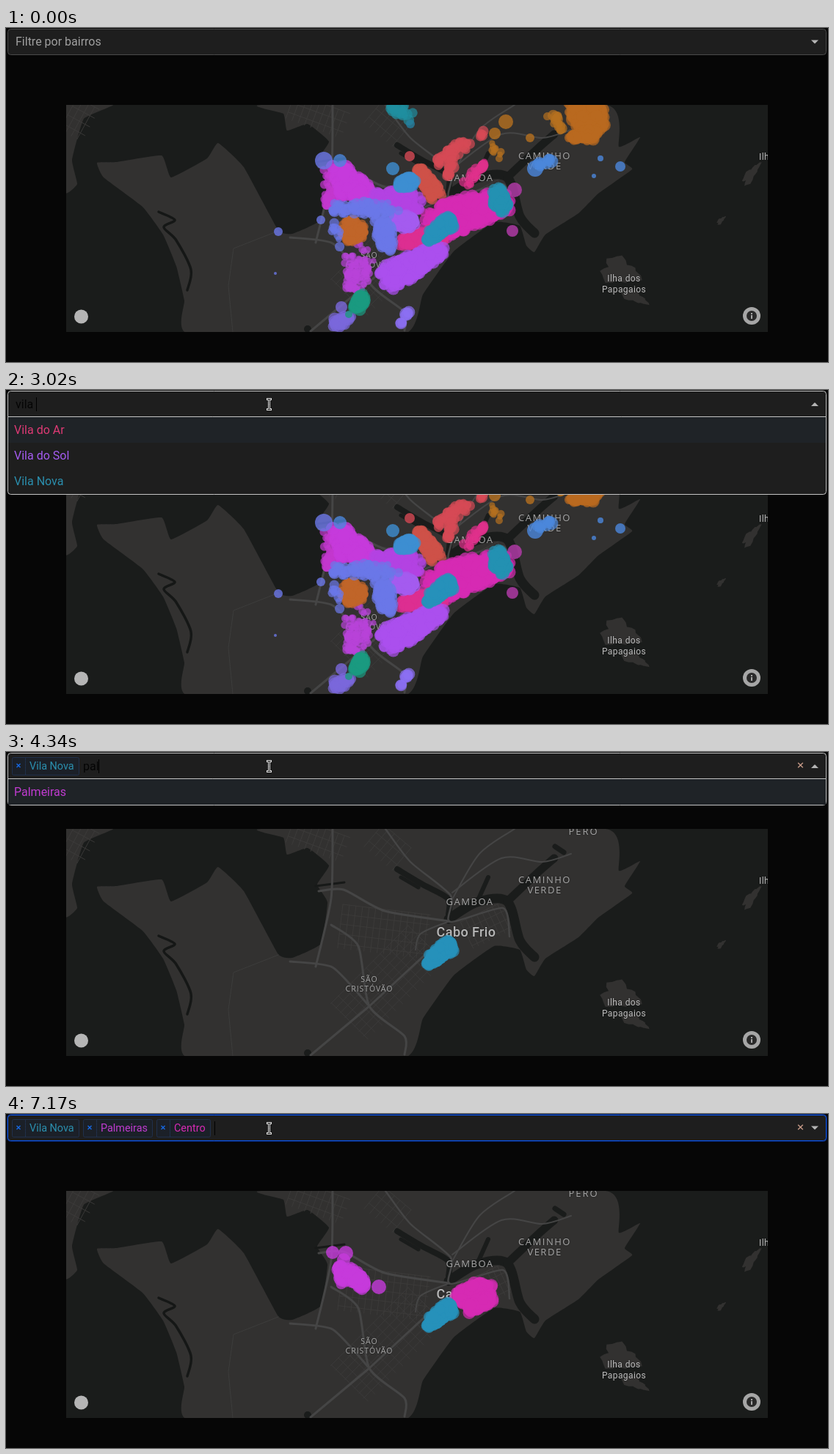
Recreate the animation shown at these times as an HTML page with a canvas. Size 1120x456 px, loop 7.66 s.

```html
<!DOCTYPE html>
<html lang="pt-BR">
<head>
<meta charset="utf-8">
<title>Filtro por bairros</title>
<style>
html, body { margin: 0; width: 100%; height: 100%; overflow: hidden; background: #060606; }
canvas { display: block; }
</style>
</head>
<body>
<canvas id="stage" width="1120" height="456"></canvas>
<script>
const W = 1120, H = 456, LOOP = 7660;
const MAP = [82, 105, 956, 310];
const ctx = document.getElementById('stage').getContext('2d');
const WATER = '#1a1c1b', LAND = '#323130', ROAD = '#454545';
const TEAL = '#2792ba', VIOLET = '#c63bdc', MAGENTA = '#d62bb4', ORANGE = '#b5701f';
const BLUE = '#4b87dc', PERIWINKLE = '#6b78e8', RED = '#d64a55', GREY = '#a6a6a6';

function layer(paint) {
  const c = document.createElement('canvas');
  c.width = W;
  c.height = H;
  const g = c.getContext('2d');
  g.beginPath();
  g.rect(...MAP);
  g.clip();
  g.lineJoin = g.lineCap = 'round';
  paint(g);
  return c;
}

// A path through flat x, y points; bend rounds it as a cardinal spline.
function trace(g, p, bend = 0, close = false) {
  const n = p.length / 2;
  const at = i => {
    const k = close ? (i + n) % n : Math.max(0, Math.min(n - 1, i));
    return [p[2 * k], p[2 * k + 1]];
  };
  g.beginPath();
  g.moveTo(p[0], p[1]);
  for (let i = 0; i < (close ? n : n - 1); i++) {
    const [ax, ay] = at(i - 1), [bx, by] = at(i), [cx, cy] = at(i + 1), [dx, dy] = at(i + 2);
    g.bezierCurveTo(bx + (cx - ax) * bend, by + (cy - ay) * bend, cx - (dx - bx) * bend, cy - (dy - by) * bend, cx, cy);
  }
}
function area(g, p, color, bend = 0) {
  trace(g, p, bend, true);
  g.fillStyle = color;
  g.fill();
}
function line(g, p, color, width, bend = 0) {
  trace(g, p, bend);
  g.strokeStyle = color;
  g.lineWidth = width;
  g.stroke();
}
function disc(g, x, y, r, color) {
  g.beginPath();
  g.arc(x, y, r, 0, 7);
  g.fillStyle = color;
  g.fill();
}
function label(g, text, x, y, font, color, align = 'left', spacing = 0) {
  g.font = font;
  g.letterSpacing = spacing + 'px';
  g.textAlign = align;
  g.fillStyle = color;
  g.fillText(text, x, y);
  g.letterSpacing = '0px';
}

let seed = 1;
function rnd() {
  seed = (seed * 1664525 + 1013904223) >>> 0;
  return seed / 4294967296;
}

// ---- base map ----
function island(g, x, y, rx, ry, tilt) {
  const p = [];
  for (let a = 0; a < 6.28; a += 0.26) {
    const k = 1 + 0.22 * Math.sin(3 * a + 1) + 0.14 * Math.sin(7 * a);
    const u = rx * k * Math.cos(a), v = ry * k * Math.sin(a);
    p.push(x + u * Math.cos(tilt) - v * Math.sin(tilt), y + u * Math.sin(tilt) + v * Math.cos(tilt));
  }
  area(g, p, LAND);
}

function streets(g, x, y, w, h, tilt, gap) {
  g.save();
  g.translate(x, y);
  g.rotate(tilt);
  g.strokeStyle = '#3d3c3b';
  g.lineWidth = 0.8;
  g.beginPath();
  for (let u = -w / 2; u <= w / 2; u += gap) {
    g.moveTo(u, -h / 2);
    g.lineTo(u, h / 2);
  }
  for (let v = -h / 2; v <= h / 2; v += gap * 1.5) {
    g.moveTo(-w / 2, v);
    g.lineTo(w / 2, v);
  }
  g.stroke();
  g.restore();
}

const lagoon = [124, 184, 150, 183, 212, 174, 225, 204, 274, 178, 289, 157, 324, 190, 371, 276, 390, 281,
  429, 262, 438, 205, 424, 181, 440, 155, 411, 131, 383, 140, 378, 117, 349, 105];
const eastCoast = [817, 105, 835, 162, 864, 149, 843, 183, 853, 193, 807, 226, 780, 253, 735, 282,
  720, 306, 709, 297, 700, 270, 665, 265, 610, 305, 568, 364, 543, 417];
const westCoast = [248, 417, 243, 372, 232, 325, 214, 282, 186, 244, 133, 204];

const base = layer(g => {
  g.fillStyle = WATER;
  g.fillRect(...MAP);
  area(g, [...lagoon, ...eastCoast, ...westCoast], LAND, 0.06);
  area(g, [80, 100, 146, 105, 106, 124, 90, 180, 97, 213, 80, 224], LAND, 0.06);
  island(g, 836, 332, 25, 17, 0.2);
  island(g, 856, 367, 18, 7, 0.4);
  island(g, 1015, 200, 17, 6, -0.95);
  island(g, 974, 263, 7, 3, -0.8);

  streets(g, 520, 315, 70, 150, 0.78, 9);
  streets(g, 515, 245, 120, 60, 0.12, 9);
  streets(g, 425, 120, 80, 36, 0.35, 9);
  streets(g, 100, 125, 34, 50, 0.5, 9);
  streets(g, 655, 237, 60, 40, -0.45, 8);
  streets(g, 520, 130, 50, 40, 0.7, 10);

  // canals
  line(g, [533, 160, 568, 181, 602, 200, 603, 222], WATER, 8, 0.15);
  line(g, [538, 171, 562, 185], WATER, 5);
  line(g, [603, 228, 642, 205, 683, 204, 700, 257, 720, 280], WATER, 13, 0.15);
  line(g, [640, 209, 657, 171], WATER, 6);
  line(g, [683, 204, 723, 166, 747, 145], WATER, 11, 0.15);
  line(g, [748, 129, 760, 137], WATER, 7);
  line(g, [208, 251, 230, 262, 215, 272, 232, 290, 252, 330, 247, 358], '#151716', 3.5, 0.15);
  line(g, [422, 183, 461, 178], '#171918', 3);
  disc(g, 411, 411, 5, WATER);
  line(g, [371, 277, 310, 301, 303, 352, 309, 415], '#3d3d3c', 1);

  // roads
  line(g, [445, 105, 443, 200, 422, 293], ROAD, 3, 0.12);
  line(g, [426, 190, 460, 188, 516, 217, 604, 231], ROAD, 3, 0.12);
  line(g, [443, 236, 480, 265, 495, 347, 543, 388, 543, 413], ROAD, 3, 0.12);
  line(g, [387, 286, 445, 294, 495, 347], ROAD, 3, 0.1);
  line(g, [415, 414, 495, 347, 602, 248], ROAD, 3);
  line(g, [517, 105, 551, 150, 606, 196, 605, 232, 677, 213, 686, 252], ROAD, 2.5, 0.12);
  line(g, [608, 192, 675, 145, 731, 150, 770, 139], ROAD, 2, 0.15);
  line(g, [693, 105, 645, 139, 608, 201], ROAD, 2, 0.15);
  line(g, [558, 270, 565, 248, 604, 231], ROAD, 2, 0.15);

  const caps = '13px "Open Sans", sans-serif', small = '10.5px "Open Sans", sans-serif';
  const town = '12px Roboto, sans-serif';
  g.shadowColor = '#222';
  g.shadowBlur = 2;
  label(g, 'PERÓ', 787, 113, caps, GREY, 'center', 2);
  label(g, 'CAMINHO', 734, 179, caps, GREY, 'center', 1.5);
  label(g, 'VERDE', 734, 193, caps, GREY, 'center', 1.5);
  label(g, 'GAMBOA', 632, 209, caps, GREY, 'center', 1.5);
  label(g, 'SÃO', 495, 314, small, GREY, 'center', 1);
  label(g, 'CRISTÓVÃO', 495, 327, small, GREY, 'center', 1);
  label(g, 'Cabo Frio', 627, 252, '500 18px Roboto, sans-serif', '#b8b8b8', 'center', 0.4);
  label(g, 'Ilha dos', 842, 346, town, '#bababa', 'center', 0.4);
  label(g, 'Papagaios', 842, 361, town, '#bababa', 'center', 0.4);
  label(g, 'Ilha', 1026, 180, town, '#bababa', 'left', 0.4);
});

// ---- data points ----
function dot(g, color, x, y, r) {
  g.globalAlpha = 0.8;
  disc(g, x, y, r, color);
  g.globalAlpha = 1;
}
// Random points around the segment a-b; each end is x, y, spread.
function cloud(g, color, a, b, count, r) {
  seed = Math.round(a[0] * 997 + b[1] * 31);
  g.globalAlpha = 0.7;
  for (let i = 0; i < count; i++) {
    const k = rnd(), turn = rnd() * 2 * Math.PI, far = Math.sqrt(rnd());
    const [x, y, spread] = a.map((v, j) => v + (b[j] - v) * k);
    disc(g, x + Math.cos(turn) * far * spread, y + Math.sin(turn) * far * spread, r * (0.6 + 0.4 * rnd()), color);
  }
  g.globalAlpha = 1;
}

function vilaNova(g) {
  cloud(g, TEAL, [575, 290, 2], [605, 265, 9], 170, 9);
  cloud(g, TEAL, [578, 281, 5], [603, 265, 8], 90, 9);
}
function palmeiras(g) {
  cloud(g, VIOLET, [455, 208, 4], [458, 229, 6], 60, 9);
  cloud(g, VIOLET, [468, 215, 9], [488, 235, 7], 140, 9);
  dot(g, VIOLET, 445, 189, 9);
  dot(g, VIOLET, 463, 190, 10);
  dot(g, VIOLET, 460, 199, 9);
  dot(g, VIOLET, 508, 236, 10);
}
function centro(g) {
  cloud(g, MAGENTA, [620, 250, 10], [652, 238, 13], 240, 9);
  cloud(g, MAGENTA, [630, 267, 7], [660, 252, 7], 120, 9);
}

const vilaLayer = layer(vilaNova);
const palmLayer = layer(palmeiras);
const centroLayer = layer(centro);
const allLayer = layer(g => {
  cloud(g, '#b96a20', [788, 105, 25], [797, 136, 20], 330, 9);
  cloud(g, '#b96a20', [770, 150, 4], [800, 145, 8], 60, 9);
  cloud(g, ORANGE, [742, 114, 8], [756, 140, 5], 16, 8);
  cloud(g, ORANGE, [660, 160, 7], [676, 178, 6], 9, 6);
  dot(g, ORANGE, 666, 144, 8);
  dot(g, ORANGE, 681, 128, 10);
  dot(g, ORANGE, 714, 150, 6);
  cloud(g, '#1f8f9f', [522, 107, 4], [547, 116, 11], 22, 8);
  dot(g, '#257fa0', 551, 131, 6);
  cloud(g, RED, [588, 183, 6], [628, 158, 9], 42, 8);
  cloud(g, RED, [603, 203, 3], [608, 180, 8], 16, 8);
  cloud(g, RED, [646, 154, 2], [649, 142, 3], 6, 8);
  dot(g, RED, 550, 175, 7);
  cloud(g, '#e0308c', [652, 183, 6], [628, 213, 6], 20, 8);
  cloud(g, '#cf5148', [562, 194, 6], [584, 226, 12], 190, 8);
  cloud(g, MAGENTA, [588, 264, 26], [674, 238, 17], 620, 9);
  cloud(g, '#dd2f92', [540, 292, 7], [588, 285, 13], 190, 8);
  dot(g, '#b83cae', 693, 221, 10);
  dot(g, '#b83cae', 690, 277, 8);
  cloud(g, '#c338cf', [440, 190, 9], [442, 245, 9], 45, 7);
  cloud(g, VIOLET, [456, 198, 12], [492, 230, 14], 230, 9);
  palmeiras(g);
  cloud(g, '#b443e3', [510, 234, 13], [553, 240, 16], 260, 9);
  cloud(g, '#b843d8', [481, 312, 22], [475, 354, 14], 100, 6);
  cloud(g, '#ab50ee', [524, 340, 20], [588, 305, 10], 420, 9);
  cloud(g, '#a45bf0', [534, 263, 10], [553, 264, 9], 130, 9);
  cloud(g, '#c0652a', [473, 277, 16], [473, 277, 16], 120, 7);
  cloud(g, PERIWINKLE, [443, 246, 8], [525, 247, 11], 62, 8);
  cloud(g, PERIWINKLE, [513, 258, 14], [519, 300, 8], 70, 9);
  cloud(g, PERIWINKLE, [446, 268, 7], [457, 299, 4], 10, 7);
  dot(g, PERIWINKLE, 429, 262, 6);
  dot(g, PERIWINKLE, 371, 278, 6);
  dot(g, PERIWINKLE, 367, 335, 2);
  dot(g, PERIWINKLE, 433, 181, 12);
  dot(g, BLUE, 455, 181, 9);
  dot(g, BLUE, 721, 192, 11);
  cloud(g, BLUE, [724, 187, 3], [743, 181, 4], 12, 9);
  dot(g, BLUE, 837, 189, 7);
  dot(g, BLUE, 810, 178, 4);
  dot(g, BLUE, 801, 202, 3);
  cloud(g, '#3d8ed2', [538, 213, 5], [552, 210, 8], 110, 9);
  dot(g, '#3d8ed2', 527, 192, 9);
  cloud(g, '#2491b2', [670, 226, 9], [675, 244, 10], 190, 9);
  vilaNova(g);
  cloud(g, '#7a68dc', [446, 404, 6], [466, 398, 8], 26, 9);
  dot(g, '#7a68dc', 457, 381, 8);
  cloud(g, '#8b6ff2', [538, 406, 2], [548, 387, 2], 8, 10);
  cloud(g, '#1b9a80', [486, 367, 6], [478, 381, 6], 80, 9);
  dot(g, '#1b9a80', 467, 391, 5);
});

// ---- select control ----
const options = [
  ['Guriri', '#ad6c1d'], ['Caminho de Búzios', '#b06b1f'], ['Ogiva', '#b26a20'], ['Cajueiro', '#b56922'],
  ['Peró', '#bb6825'], ['Bosque do Peró', '#c0652a'], ['Jacaré', '#cf5148'], ['Gamboa', RED],
  ['Vila do Ar', '#dd3a74'], ['Portinho', '#e0308c'], ['Novo Portinho', '#dd2f9c'], ['Centro', MAGENTA],
  ['Centro Hípico', '#cc34c6'], ['Palmeiras', '#c03bd0'], ['São Cristóvão', '#b443e3'], ['Vila do Sol', '#a45bf0'],
  ['Praia do Siqueira', PERIWINKLE], ['Passagem', '#2491b2'], ['Vila Nova', '#2b8fae']
];
const OPEN = 840;
const searches = [
  { word: 'vila nova', keys: [1610, 1730, 1830, 1930, 3020, 3080, 3160, 3230, 3300], enter: 3500, pick: 'Vila Nova' },
  { word: 'palmeira', keys: [4160, 4250, 4340, 4470, 4570, 4750, 4840, 5140], enter: 5300, pick: 'Palmeiras' },
  { word: 'centr', keys: [5990, 6180, 6260, 6410, 6520], enter: 6710, pick: 'Centro' }
];
const presses = [OPEN, ...searches.flatMap(s => [...s.keys, s.enter])];
const CARET_ON = 465;
const FONT = '16px Roboto, sans-serif', CHIP_FONT = '14.4px Roboto, sans-serif';

function typedAt(t) {
  const s = searches.find(s => t >= s.keys[0] && t < s.enter);
  return s ? s.word.slice(0, s.keys.filter(k => k <= t).length) : '';
}

function frame(x, y, w, h, radii, fill, stroke, width = 1) {
  ctx.beginPath();
  ctx.roundRect(x, y, w, h, radii);
  ctx.fillStyle = fill;
  ctx.fill();
  ctx.strokeStyle = stroke;
  ctx.lineWidth = width;
  ctx.stroke();
}
function triangle(x, y, w, h, color) {
  area(ctx, [x - w, y, x + w, y, x, y + h], color);
}
function cross(x, y, r, color) {
  line(ctx, [x - r, y - r, x + r, y + r], color, 1.4);
  line(ctx, [x - r, y + r, x + r, y - r], color, 1.4);
}

function drawList(query, chosen) {
  const rows = options.filter(([name]) => !chosen.includes(name) && name.toLowerCase().includes(query));
  const h = Math.min(200, rows.length * 35);
  frame(2.5, 36.5, 1115, h + 1, [0, 0, 4, 4], '#1e1e1e', '#c4c4c4');
  ctx.save();
  ctx.beginPath();
  ctx.rect(3, 37, 1114, h);
  ctx.clip();
  ctx.fillStyle = '#1f2327';
  ctx.fillRect(3, 37, 1114, 35);
  rows.forEach(([name, color], i) => label(ctx, name, 11, 60 + i * 35, FONT, color));
  if (rows.length * 35 > h) {
    ctx.fillStyle = '#a0a0a0';
    ctx.fillRect(1102, 37, 15, h);
    triangle(1109.5, 227, 4, 4, '#444');
  }
  ctx.restore();
}

function drawChip(x, name) {
  ctx.font = CHIP_FONT;
  const w = Math.round(ctx.measureText(name).width) + 30;
  frame(x + 0.5, 7.5, w, 24, 2, '#1b2028', '#20304c');
  line(ctx, [x + 18.5, 8, x + 18.5, 31], '#20304c', 1);
  cross(x + 9, 18.5, 2.5, '#1767e0');
  label(ctx, name, x + 24, 24, CHIP_FONT, options.find(o => o[0] === name)[1]);
  return x + w + 6;
}

function drawControl(t) {
  const query = typedAt(t);
  const chosen = searches.filter(s => t >= s.enter).map(s => s.pick);
  const open = query !== '' || (t >= OPEN && t < searches[0].keys[0]);
  const focused = chosen.length > 0 && !open;
  if (focused) frame(2.5, 1.5, 1115, 35, 4, '#1e1e1e', 'rgba(10,80,255,.3)', 3);
  frame(2.5, 1.5, 1115, 35, open ? [4, 4, 0, 0] : 4, '#1e1e1e', focused ? '#0b57f0' : open ? '#c4c4c4' : '#4a4a4a');
  if (open) drawList(query, chosen);

  const chipsEnd = chosen.reduce(drawChip, 8);
  const start = chosen.length ? chipsEnd : 13;
  if (query) label(ctx, query, start, 25, FONT, '#050505');
  else if (!chosen.length) label(ctx, 'Filtre por bairros', 13, 24, FONT, '#a0a0a0');

  const pressed = presses.findLast(p => p <= t);
  if (t - pressed < CARET_ON) {
    ctx.font = FONT;
    ctx.fillStyle = '#000';
    ctx.fillRect(Math.round(start + ctx.measureText(query).width - 0.4), 10, 1, 19);
  }
  if (chosen.length) cross(1082.5, 18, 3.3, '#c69a88');
  triangle(1102, open ? 22 : 16.5, 5, open ? -5 : 5, '#b4b4b4');
}

// ---- scene ----
const ramp = (t, a, b) => Math.max(0, Math.min(1, (t - a) / (b - a)));
const mix = (a, b, k) => a + (b - a) * k;

function drawPointer(t) {
  if (t < 110) return;
  // One sweep from the lower right corner, then a short correction into the field.
  const sweep = ramp(t, 110, 560), settle = ramp(t, 560, 690);
  let x = mix(mix(1097, 321, sweep), 345, settle);
  let y = mix(mix(411, 90, sweep), 31, settle);
  if (t >= OPEN) [x, y] = t < 880 ? [352, 25] : [358, 19];
  ctx.save();
  ctx.translate(Math.round(x) + 0.5, Math.round(y) + 0.5);
  if (y < 38) {
    ctx.lineCap = 'square';
    for (const [color, width] of [['#ddd', 3], ['#111', 1]]) {
      line(ctx, [0, -6, 0, 6], color, width);
      line(ctx, [-2, -7, 2, -7], color, width);
      line(ctx, [-2, 7, 2, 7], color, width);
    }
  } else {
    area(ctx, [0, 0, 0, 16, 4, 12, 7, 18, 9, 17, 6.5, 11.5, 11.5, 11.5], '#111');
    ctx.strokeStyle = '#eee';
    ctx.lineWidth = 1;
    ctx.stroke();
  }
  ctx.restore();
}

function show(img, alpha) {
  ctx.globalAlpha = alpha;
  ctx.drawImage(img, 0, 0);
  ctx.globalAlpha = 1;
}

function drawMap(t) {
  show(base, 1);
  show(allLayer, 1 - ramp(t, 3650, 3800));
  const reload = t < 5450 ? ramp(t, 3700, 3980) : t < 6930 ? ramp(t, 5500, 5740) : ramp(t, 6930, 7150);
  show(palmLayer, t < 5450 ? 0 : reload);
  show(centroLayer, t < 6930 ? 0 : reload);
  show(vilaLayer, reload);

  disc(ctx, 102.5, 394, 9.5, '#b5b5b5');
  disc(ctx, 1016, 393, 12, GREY);
  disc(ctx, 1016, 393, 7, '#2a2a2a');
  ctx.fillStyle = GREY;
  ctx.fillRect(1015, 389, 2, 2);
  ctx.fillRect(1015, 392, 2, 5);
}

const startTime = performance.now();
function render(now) {
  const t = Math.max(0, now - startTime) % LOOP;
  ctx.fillStyle = '#060606';
  ctx.fillRect(0, 0, W, H);
  drawMap(t);
  drawControl(t);
  drawPointer(t);
  requestAnimationFrame(render);
}
render(startTime);
</script>
</body>
</html>
```
